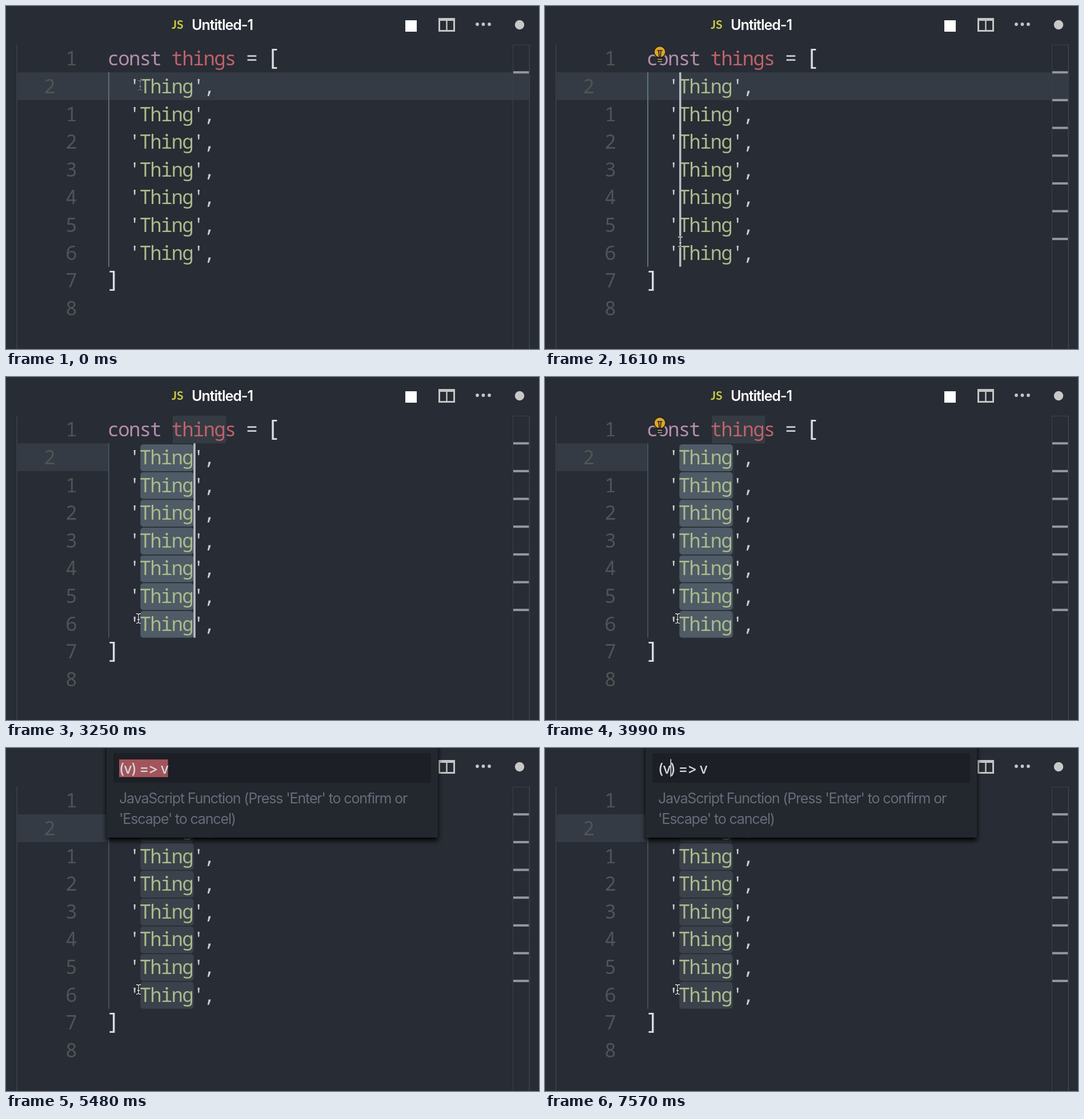
An HTML page for the animation above (8 s loop, 933 px wide and 601 px high).

```html
<!DOCTYPE html>
<html lang="en">
<head>
<meta charset="utf-8">
<title>Multi-cursor editing</title>
<style>
  html, body { margin: 0; width: 100%; height: 100%; overflow: hidden; background: #282c34; }
  svg { display: block; width: 100%; height: 100%; }
  text { white-space: pre; }
  .code { font: 500 34px "Noto Sans Mono", "DejaVu Sans Mono", monospace; font-stretch: semi-condensed; text-anchor: middle; fill: #c8ccd3; }
  .code .keyword { fill: #b48ead; }
  .code .name { fill: #bf616a; }
  .code .string { fill: #a9ba8b; }
  .code .bracket { fill: #d8dbe0; font-size: 40px; }
  .code .number { fill: #515457; }
  .ui { font: 25px Inter, Roboto, sans-serif; font-optical-sizing: none; letter-spacing: -1.15px; fill: #646d79; }
  .ui .bright { fill: #dfe2e8; }
  .ui .title { fill: #fff; font-weight: 600; letter-spacing: -1px; }
  .ui .input { fill: #d3d6db; font-weight: 500; letter-spacing: -1px; }
  .ui .hint { fill: #3079b3; }
  .ui .key { fill: #ced1d6; font-size: 22px; font-weight: 500; letter-spacing: 0; text-anchor: middle; }
  .panel { filter: drop-shadow(0 5px 4px #000); }
</style>
</head>
<body>
<svg viewBox="0 0 933 601" xmlns="http://www.w3.org/2000/svg">
  <rect width="933" height="601" fill="#282c34"/>
  <g id="backdrop"></g>
  <g id="code" class="code"></g>
  <g id="chrome"></g>
  <g id="overlay"></g>
  <g id="palette" class="ui"></g>
</svg>
<script>
const LOOP = 8000;
const ROW_TOP = 67.6, ROW_H = 48.65, COL_X = 179, COL_W = 18.65;
const ITEMS = [1, 2, 3, 4, 5, 6, 7];

const $ = id => document.getElementById(id);
const rowY = row => ROW_TOP + row * ROW_H;
const colX = col => COL_X + col * COL_W;
const rect = (x, y, w, h, fill, more = '') =>
  `<rect x="${x}" y="${y}" width="${w}" height="${h}" fill="${fill}" ${more}/>`;
const label = (x, y, text, cls = '') => `<text x="${x}" y="${y}" class="${cls}">${text}</text>`;

// Each character is centred in its cell of the editor grid.
const glyphs = (x, row, text, cls) => {
  const centers = [...String(text)].map((_, i) => (x + (i + 0.5) * COL_W - 0.4).toFixed(2));
  return label(centers.join(' '), rowY(row) + 36.6, text, cls);
};
const token = (col, row, text, cls) => glyphs(colX(col), row, text, cls);

// Value of the last [time, value] pair that has been reached.
const at = (steps, t) => steps.filter(([time]) => time <= t).pop()[1];

const SELECTED = [[0, 0], [2500, 1], [2650, 2], [2800, 3], [2950, 4], [3250, 5]];
const CURSOR_ALPHA = [[0, 0], [290, 1], [3840, 0.5], [3990, 0.04], [4280, 0]];
const BULB = [[0, 0], [1610, 1], [1760, 0], [3390, 1], [4280, 0]];
const PALETTE = [[0, ''], [4280, 'commands'], [5480, 'prompt']];
const COMMAND_CARET = [[0, 1], [4730, 0], [5180, 1]];
const PROMPT_CARET = [[0, 0], [6680, 199], [6830, 207], [7120, 220], [7270, 228], [7570, 220]];
const GUIDE = [[0, '#697180'], [1460, '#657b85'], [2500, '#455565']];
const MOUSE_END = [[1460, [237, 411]], [1610, [237, 413]], [1760, [237, 424]],
  [1910, [237, 430]], [2200, [232, 423]]];

function mouseAt(t) {
  if (t < 290) return [235, 139];
  if (t >= 1460) return at(MOUSE_END, t);
  const u = (Math.floor((t - 290) / 147) + 1) / 8;
  return [235 + 2 * u, 139 + 256 * u * u * (3 - 2 * u)];
}

function drawCode() {
  const lines = ITEMS.map(row =>
    token(2, row, "'") + token(3, row, 'Thing', 'string') + token(8, row, "',")).join('');
  const numbers = [1, 2, 3, 4, 5, 6, 7, 8].map(n => glyphs(105.5, n + 1, n, 'number')).join('');
  $('code').innerHTML =
    token(0, 0, 'const', 'keyword') + token(6, 0, 'things', 'name') +
    token(13, 0, '=') + token(15, 0, '[', 'bracket') +
    lines + token(0, 8, ']', 'bracket') +
    glyphs(105.5, 0, 1, 'number') + glyphs(67.5, 1, 2, 'number') + numbers;
}

function drawChrome() {
  const dots = [825, 835.5, 846].map(x => `<circle cx="${x}" cy="32" r="2.9" fill="#c5c5c5"/>`).join('');
  $('chrome').innerHTML =
    `<text x="290" y="40" fill="#cbcb41" style="font:700 21px Lato,sans-serif">JS</text>` +
    `<g class="ui">${label(325, 42, 'Untitled-1', 'title')}</g>` +
    rect(699, 25, 20, 20, '#fff') +
    `<path d="M757 21h29v24h-29zM760 26v16h10.3v-16zM772.7 26v16h10.3v-16z" fill="#c5c5c5" fill-rule="evenodd"/>` +
    dots + `<circle cx="899" cy="33" r="8.2" fill="#c8c8c8"/>` +
    rect(18.5, 68, 1.6, 533, '#404348') +
    `<path d="M887.5 601V68.5H916" fill="none" stroke="#3c4046"/>` +
    rect(915.5, 68, 1.6, 533, '#404348');
}

function bulb() {
  return `<g stroke="#25221d"><circle cx="201" cy="80.5" r="10" fill="#dba62b" stroke-width="1.5"/>
    <path d="M196.5 78h9M199 78l1 12M203 78l-1 12" fill="none" stroke-width="1.7"/>
    <rect x="196" y="90" width="10" height="10.5" rx="2" fill="#25221d"/>
    <path d="M197 93.5h8M197 97.5h8" stroke="#aeb0b3" stroke-width="1.5"/></g>`;
}

function ibeam([x, y], dim) {
  const shape = 'M-4-8.5Q0-8.5 0-6Q0-8.5 4-8.5M0-6V6M-4 8.5Q0 8.5 0 6Q0 8.5 4 8.5M-2 2H2';
  return `<g transform="translate(${x} ${y})" fill="none">
    <path d="${shape}" stroke="#17191d" stroke-width="3"/>
    <path d="${shape}" stroke="${dim ? '#82878e' : '#e4e6e9'}" stroke-width="1.3"/></g>`;
}

function panel(height, inputBottom) {
  return `<g class="panel">${rect(176, -10, 580, height + 10, '#23272e')}</g>` +
    rect(188, 9, 556, inputBottom - 9, '#1c1f26');
}

const caret = x => rect(x - 0.5, 19.5, 1.5, 31, '#e4e6ea');

function commands(t) {
  const names = ['Map and Replace Selections wi…', 'Presentation mode', 'Reload Window',
    'DotFern: Open Settings', 'Preferences: Color Theme'];
  const keys = [[547, 46, '⌘'], [595, 36, 'K'], [637, 45, '⌘'], [683, 37, 'T']];
  return panel(307, 60) +
    rect(176, 72, 580, 44, '#333a42') + rect(736, 72, 20, 40, '#454b54') +
    label(198, 45, '&gt;', 'input') + (at(COMMAND_CARET, t) ? caret(214.5) : '') +
    names.map((name, i) => label(198, 103.7 + 44.5 * i, name, i ? '' : 'bright')).join('') +
    label(571, 103.7, 'recently used', 'hint') +
    keys.map(([x, w, key]) =>
      rect(x, 254, w, 36, '#30343b', 'rx="4"') + label(x + w / 2, 280, key, 'key')).join('');
}

function prompt(t) {
  const x = at(PROMPT_CARET, t);
  return panel(157, 61) +
    (x ? '' : rect(198, 20, 85.5, 31, '#a2545a')) +
    label(198, 45, '(v) =&gt; v', 'input') + (x ? caret(x) : '') +
    label(198, 97, "JavaScript Function (Press 'Enter' to confirm or") +
    label(198, 133, "'Escape' to cancel)");
}

function render(t) {
  const mouse = mouseAt(t);
  const last = t < 1910 ? Math.floor((mouse[1] - ROW_TOP) / ROW_H) : 7;
  const rows = ITEMS.slice(0, last);
  const selected = at(SELECTED, t);
  const mode = at(PALETTE, t);
  const width = selected * COL_W;

  let back = rect(20.5, rowY(1), selected ? 159 : 895, ROW_H, '#343b44') +
    rect(179, rowY(1), 1.8, ROW_H * 7, at(GUIDE, t));
  if (selected) {
    const fill = mode ? '#3c424b' : '#4f5b66';
    back += rect(colX(6) + 1, rowY(0), width, ROW_H, '#343b43') +
      rows.map(row => rect(colX(3) + 0.3, rowY(row) + 1.8, width, 46.9, fill, 'rx="5"')).join('');
  }
  back += rows.map(row => rect(888, rowY(row) - 2, 27.5, 4, '#9498a0')).join('');
  $('backdrop').innerHTML = back;

  $('overlay').innerHTML =
    rect(colX(3 + selected), rowY(1), 3.5, ROW_H * last, '#b9bec7', `opacity="${at(CURSOR_ALPHA, t)}"`) +
    (at(BULB, t) ? bulb() : '') + ibeam(mouse, t < 290);

  $('palette').innerHTML = mode === 'commands' ? commands(t) : mode === 'prompt' ? prompt(t) : '';
}

function tick() {
  render(performance.now() % LOOP);
  requestAnimationFrame(tick);
}

drawCode();
drawChrome();
tick();
</script>
</body>
</html>
```
